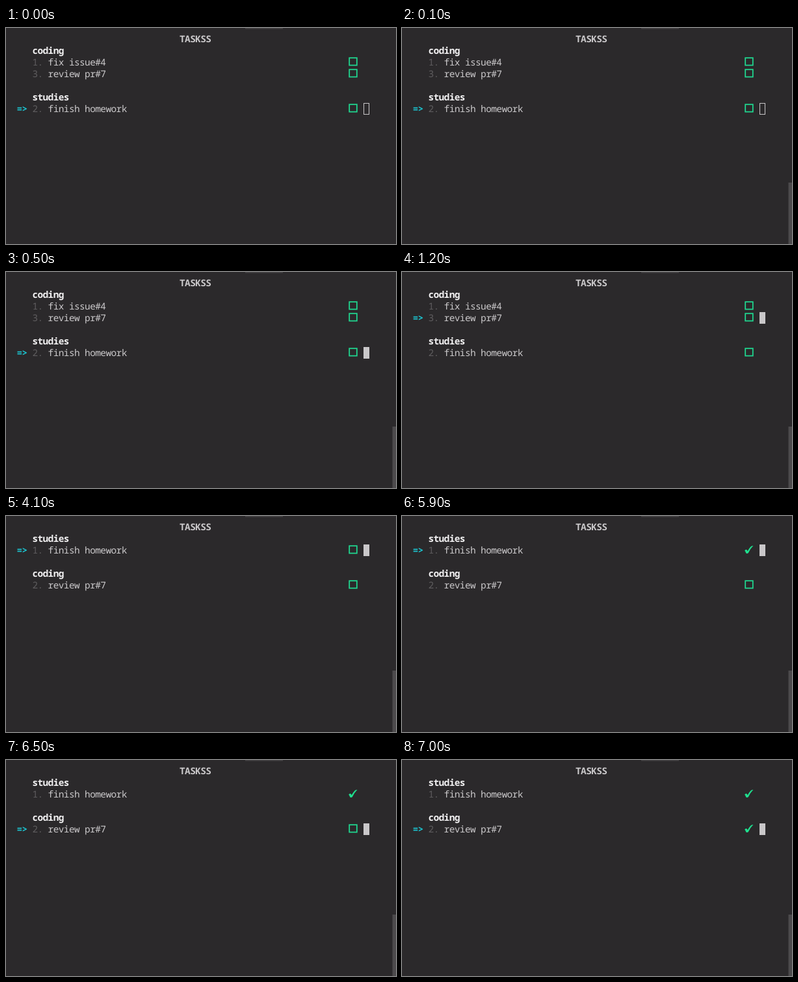
Animation of 600 by 334 pixels, one loop 8 s. Source, as an HTML page:

```html
<!DOCTYPE html>
<html lang="en">
<head>
<meta charset="utf-8">
<title>Task list</title>
<style>
  html, body { margin: 0; width: 100%; height: 100%; overflow: hidden; background: #2b292b; }
  svg { display: block; width: 600px; height: 334px; }
  text {
    font: 14.4px "Noto Sans Mono", "DejaVu Sans Mono", monospace;
    letter-spacing: -0.56px;
    fill: #cbc9cb;
    text-rendering: geometricPrecision;
  }
  .title, .head, .arrow { font-weight: 700; }
  .head { fill: #f2f1f2; }
  .num { fill: #5f5d5f; }
  .arrow { fill: #1cc5d1; }
  .box { fill: none; stroke: #20d68f; stroke-width: 1.8; }
  .check { fill: #1fe08f; }
  .bar { fill: #4c4a4c; }
  .solid { fill: #c9c7c9; }
  .hollow { fill: none; stroke: #c9c7c9; }

  /* every change is a hard cut */
  .bar, .solid, .hollow, .pointer, .before, .after, .todo1, .done1, .todo2, .done2 {
    animation: 8s step-end infinite;
  }
  .bar { animation-name: from100; }
  .solid { animation-name: from500; }
  .hollow { animation-name: until500; }
  .pointer { animation-name: move; }
  .before { animation-name: until4100; }
  .after { animation-name: from4100; }
  .todo1 { animation-name: until5900; }
  .done1 { animation-name: from5900; }
  .todo2 { animation-name: until7000; }
  .done2 { animation-name: from7000; }

  @keyframes from100 { 0% { opacity: 0 } 1.25%, 100% { opacity: 1 } }
  @keyframes from500 { 0% { opacity: 0 } 6.25%, 100% { opacity: 1 } }
  @keyframes until500 { 0% { opacity: 1 } 6.25%, 100% { opacity: 0 } }
  @keyframes from4100 { 0% { opacity: 0 } 51.25%, 100% { opacity: 1 } }
  @keyframes until4100 { 0% { opacity: 1 } 51.25%, 100% { opacity: 0 } }
  @keyframes from5900 { 0% { opacity: 0 } 73.75%, 100% { opacity: 1 } }
  @keyframes until5900 { 0% { opacity: 1 } 73.75%, 100% { opacity: 0 } }
  @keyframes from7000 { 0% { opacity: 0 } 87.5%, 100% { opacity: 1 } }
  @keyframes until7000 { 0% { opacity: 1 } 87.5%, 100% { opacity: 0 } }
  @keyframes move {
    0% { transform: translateY(116px) }
    15% { transform: translateY(62px) }
    18.75% { transform: translateY(44px) }
    81.25%, 100% { transform: translateY(98px) }
  }
</style>
</head>
<body>
<svg viewBox="0 0 600 334">
  <defs>
    <rect id="box" class="box" x="528.2" y="2.2" width="11.6" height="11.4"/>
    <path id="check" class="check" d="M527.2 9.4Q528.6 7.9 529.9 8Q531 8.2 531.7 10.3Q535.2 4.2 537.8 2.6Q538.9 2 540.4 2.1Q536 6.400 532.900 13Q532.200 14.100 530.800 14.100Q529.500 14.200 529.200 13.300Q528.300 10.300 527.200 9.400Z"/>
  </defs>

  <rect x="368" width="58" height="1.5" fill="#454345"/>
  <rect class="bar" x="594.5" y="239" width="5.5" height="95"/>
  <text class="title" x="267" y="22">TASKSS</text>

  <g class="before">
    <text class="head" x="40.4" y="40">coding</text>
    <g transform="translate(0 44)">
      <text class="num" x="40.4" y="14">1.</text>
      <text x="64.6" y="14">fix issue#4</text>
      <use href="#box"/>
    </g>
    <g transform="translate(0 62)">
      <text class="num" x="40.4" y="14">3.</text>
      <text x="64.6" y="14">review pr#7</text>
      <use href="#box"/>
    </g>
    <text class="head" x="40.4" y="112">studies</text>
    <g transform="translate(0 116)">
      <text class="num" x="40.4" y="14">2.</text>
      <text x="64.6" y="14">finish homework</text>
      <use href="#box"/>
    </g>
  </g>

  <g class="after">
    <text class="head" x="40.4" y="40">studies</text>
    <g transform="translate(0 44)">
      <text class="num" x="40.4" y="14">1.</text>
      <text x="64.6" y="14">finish homework</text>
      <use class="todo1" href="#box"/>
      <use class="done1" href="#check"/>
    </g>
    <text class="head" x="40.4" y="94">coding</text>
    <g transform="translate(0 98)">
      <text class="num" x="40.4" y="14">2.</text>
      <text x="64.6" y="14">review pr#7</text>
      <use class="todo2" href="#box"/>
      <use class="done2" href="#check"/>
    </g>
  </g>

  <g class="pointer">
    <text class="arrow" x="16.4" y="14">=&gt;</text>
    <rect class="hollow" x="550.5" y="0.5" width="8" height="17"/>
    <rect class="solid" x="550" y="0" width="9" height="18"/>
  </g>
</svg>
</body>
</html>
```
